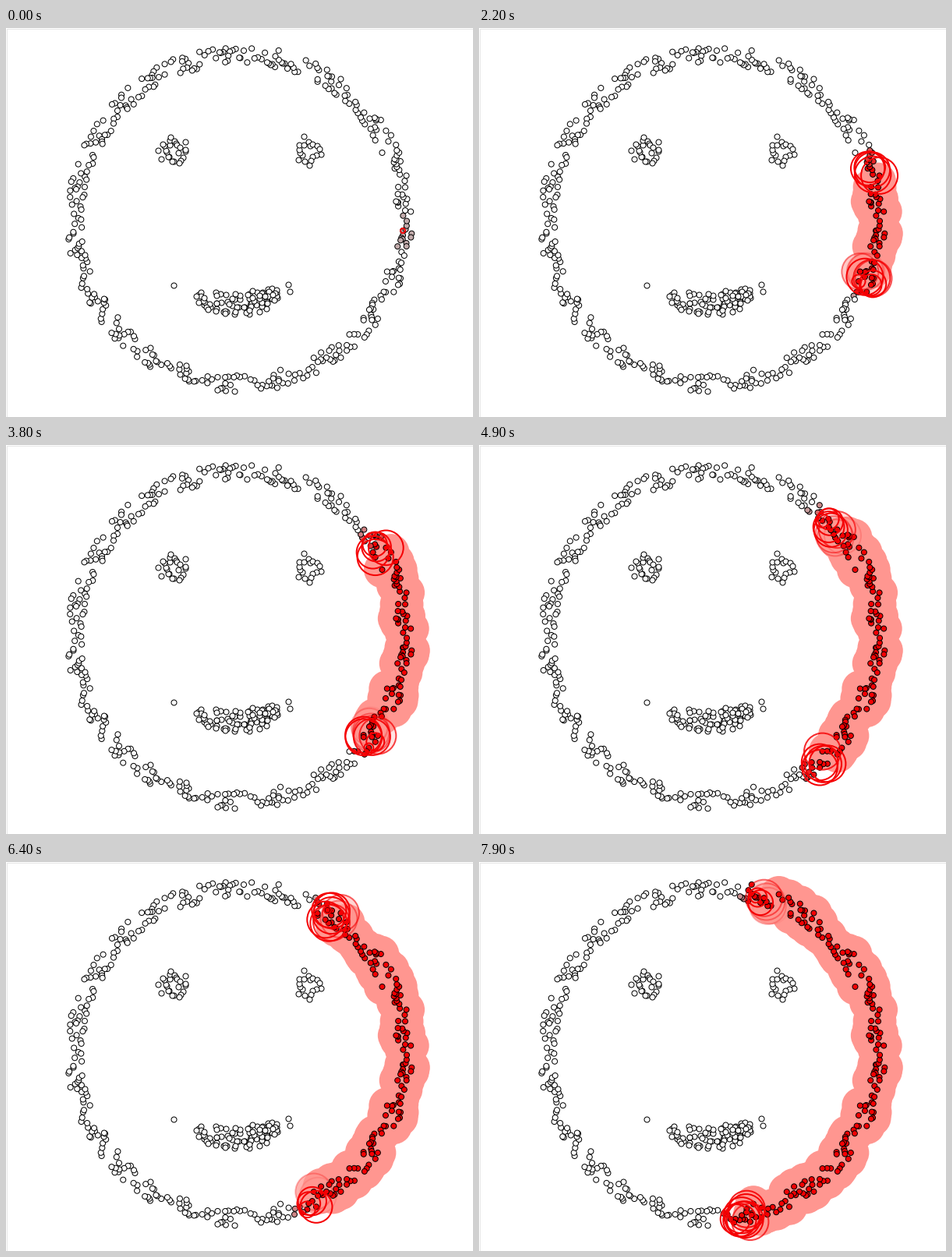
A matplotlib script that plays this animation: 599 by 499 pixels, repeating every 8 s.

```python
import random
from collections import deque
from math import atan2, cos, hypot, sin, tau

import matplotlib.pyplot as plt
import numpy as np
from matplotlib.animation import FuncAnimation
from matplotlib.patches import Rectangle

W, H, DPI = 599, 499, 64
PX = 72 / DPI
FRAMES, STEP = 80, 100
CX, CY, R = 300, 245, 211
SEED = (509, 260)
EPS, DOT = 23.5, 3.5
PACE = 45                            # ms between two visited dots
GROW, FADE, TINT = 400, 270, 450     # ms
RED = np.array([0.96, 0.0, 0.01])
GREY = np.array([0.76, 0.67, 0.67])
HALO = np.array([1.0, 0.588, 0.565])

rng = random.Random(12)


def polar(cx, cy, r, a):
    return cx + r * cos(a), cy + r * sin(a)


def around(n):
    """Evenly spread random angles."""
    return [tau * (i + rng.random()) / n for i in range(n)]


def face_ring(n=400):
    # A wavering sine pulls the dots together into clumps.
    return [polar(CX, CY, R + rng.uniform(-11, 11),
                  u + 0.022 * sin(22 * u + 2 * sin(3 * u)))
            for u in around(n)]


def eye(cx, cy, n):
    return [polar(cx, cy, rng.uniform(8, 20), a) for a in around(n)]


def mouth(n=85):
    dots = []
    for _ in range(n):
        s = rng.triangular(-1, 0.92, 0.25)
        thick = 2 + 14 * (1 - s * s)
        dots.append((295 + 95 * s,
                     354 - 42 * s * s + rng.uniform(-thick, thick)))
    return dots


def from_seed(p):
    """Sort key: upper arm first, then by angle away from the seed."""
    turn = atan2(p[1] - CY, p[0] - CX) - atan2(SEED[1] - CY, SEED[0] - CX)
    return turn > 0, abs(turn)


def spread(dots):
    """Breadth-first search: when each dot is visited and first seen."""
    start = np.full(len(dots), np.inf)
    seen = start.copy()
    seen[0], queue, now = 0, deque([0]), 0
    while queue:
        i = queue.popleft()
        start[i] = now
        for j, (x, y) in enumerate(dots):
            if np.isinf(seen[j]) and hypot(x - dots[i][0], y - dots[i][1]) < EPS:
                seen[j] = now
                queue.append(j)
        now += PACE
    return start, seen


ring_dots = [SEED] + sorted(face_ring(), key=from_seed)
features = eye(214, 157, 24) + eye(387, 158, 18) + mouth()
start, seen = spread(ring_dots)

fig = plt.figure(figsize=(W / DPI, H / DPI), dpi=DPI, facecolor="white")
ax = fig.add_axes([0, 0, 1, 1])
ax.set(xlim=(0, W), ylim=(H, 0))
ax.axis("off")
ax.add_patch(Rectangle((0.5, 0.5), W - 1, H - 1, fill=False, ec="#e6e6e6", lw=PX))


def discs(points, radius, z, **style):
    x, y = np.array(points, float).T
    return ax.scatter(x, y, s=(2 * radius * PX) ** 2, zorder=z, **style)


outlined = dict(c="white", edgecolors="black", linewidths=PX)
halos = discs(ring_dots, EPS, 1, linewidths=0)
discs(features, DOT, 2, **outlined)
dots = discs(ring_dots, DOT, 2, **outlined)
rings = discs(ring_dots, EPS, 3, facecolors="none", linewidths=2 * PX)


def rgba(color, alpha):
    return np.column_stack([np.tile(color, (len(alpha), 1)), alpha])


def draw(frame):
    t = frame * STEP
    grow = np.clip((t - start) / GROW, 0, 1)
    fade = np.clip((t - start - GROW) / FADE, 0, 1)
    radius = 3 + (EPS - 3) * (1 - (1 - grow) ** 3)
    rings.set_sizes((2 * radius * PX) ** 2)
    rings.set_edgecolors(rgba(RED, np.where(t >= start, 1 - fade, 0)))
    halos.set_facecolors(rgba(HALO, fade))

    tint = np.clip((t - seen) / TINT, 0, 1)[:, None]
    color = GREY + (RED - GREY) * tint
    color[t < seen] = 1
    dots.set_facecolors(color)
    return halos, dots, rings


anim = FuncAnimation(fig, draw, frames=FRAMES, interval=STEP, repeat=True,
                     repeat_delay=0, blit=False)
plt.show()
```
